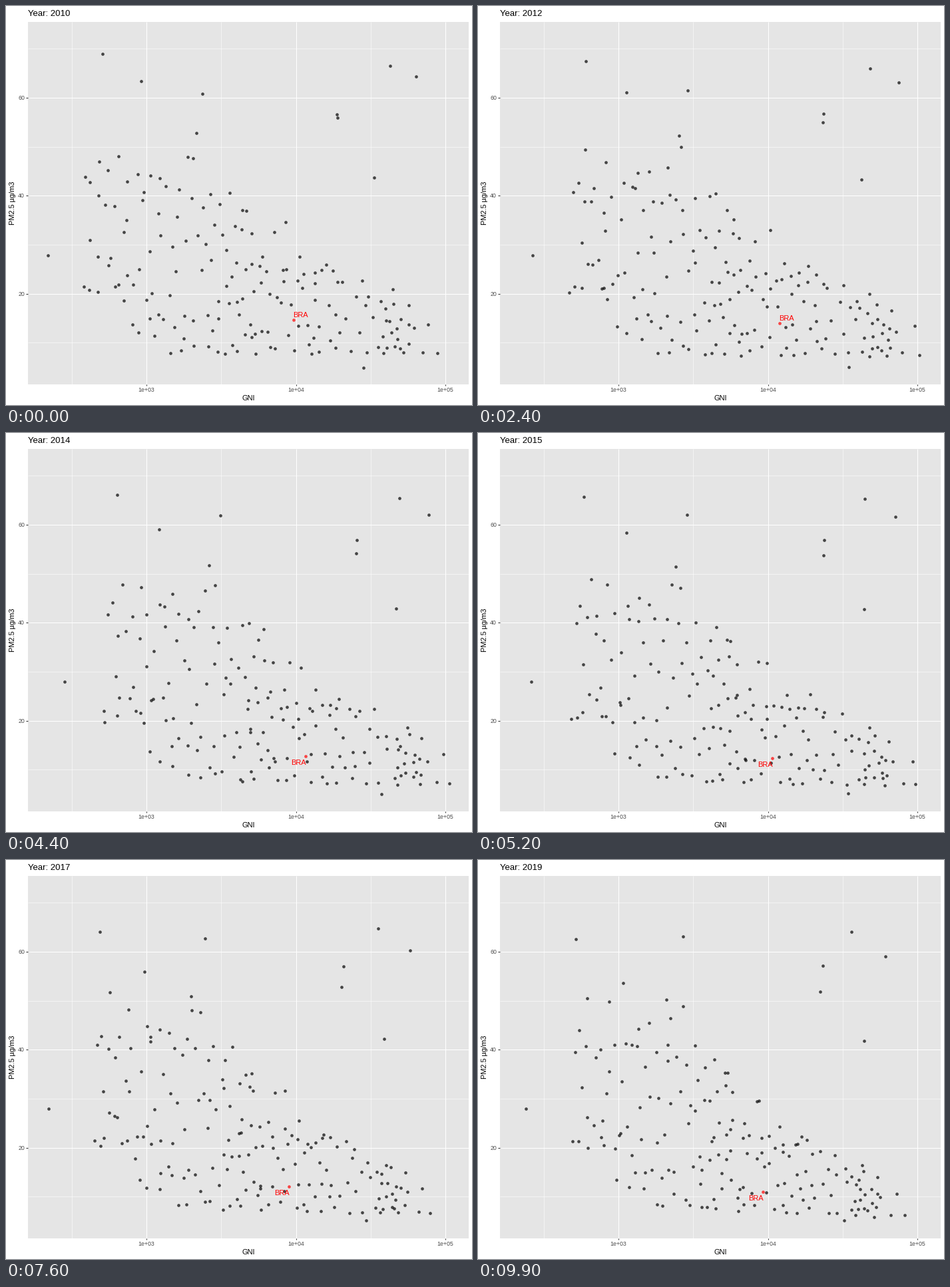
A matplotlib script for the animation above (10000 ms loop, 700 px wide and 600 px high).

```python
import numpy as np
import matplotlib.pyplot as plt
from matplotlib.animation import FuncAnimation
from matplotlib.patches import Rectangle

W, H, DPI = 700, 600, 100
FRAMES, STEPS, YEARS = 100, 11, 10      # 11 tween steps between yearly states
CLOUD = 172                             # dots in the random cloud
PX = 72 / DPI                           # points per pixel
LEFT, RIGHT, TOP, BOTTOM = 33, 694.5, 23.5, 568.5

plt.rcParams["font.family"] = "Liberation Sans"
rng = np.random.default_rng(5)
frames = np.arange(FRAMES)
years = frames / STEPS


def gni_x(log_gni):
    return 211 + 224.5 * (log_gni - 3)


def pm_y(pm):
    return 580 - 7.37 * pm


# Income swing shared by all dots: up until 2013, down until 2017, recovery.
swing = np.interp(years, [0, 3, 4, 6, 7, 9], [0, 23, 21, -2, -6, 0])

# Isolated dots: start x, y and end x, y.
OUTLIERS = np.array([
    [145, 71.5, 147, 119], [202.5, 112.5, 217.5, 184.5],
    [295, 131.5, 307.5, 114.5], [285.5, 190.5, 283, 210],
    [576.5, 90, 561, 107.5], [616, 106, 612, 145],
    [497, 163, 517.5, 158.5], [498, 168, 513.5, 198],
    [553, 258, 579.5, 272], [63, 375, 71.5, 373.5],
    [537, 543.5, 550, 541.5], [648, 522, 640.5, 533.5],
])


def drift(x0, y0, x1, y1):
    """Straight trend from start to end, plus the shared swing in x."""
    t = frames / (FRAMES - 1)
    return (x0[:, None] + np.outer(x1 - x0, t) + swing,
            y0[:, None] + np.outer(y1 - y0, t))


def wobble(size):
    """Independent yearly noise for the cloud, tweened linearly."""
    states = rng.normal(0, size, (CLOUD, YEARS))
    return np.array([np.interp(years, range(YEARS), s) for s in states])


def cloud():
    """Air gets cleaner, and its spread smaller, as income grows."""
    i = np.arange(CLOUD)
    u = (i + rng.random(CLOUD)) / CLOUD
    v = (i * 0.618034 + rng.normal(0, 0.06, CLOUD)) % 1
    x = np.interp(u, [0, 0.15, 0.4, 0.57, 0.8, 0.88, 0.98, 1],
                  [115, 200, 320, 380, 500, 565, 605, 640])
    floor = np.interp(x, [115, 250], [20, 7.3])
    span = np.interp(x, [115, 250, 350, 450, 600], [32, 44, 32, 24, 12])
    pm = floor + span * v ** 1.2
    x_end = x + np.interp(x, [170, 650], [27, -7])
    pm_end = pm * np.interp(x, [300, 600], [1, 0.78])
    xs, pms = drift(x, pm, x_end, pm_end)
    return xs + wobble(3), pm_y(pms * (1 + wobble(0.03)))


dots_x, dots_y = map(np.vstack, zip(drift(*OUTLIERS.T), cloud()))

# Highlighted country and its label side (1 = above right, -1 = below left).
bra_keys = [0, 14, 35, 52, 66, 85, 99]
bra_x = np.interp(frames, bra_keys, [432, 448, 458.5, 442, 424, 425.5, 427.5])
bra_y = np.interp(frames, bra_keys, [472, 472, 483, 489, 491.5, 490, 499])


def label_side(i):
    return 1 if i < 25 or 80 <= i < 93 else -1


fig = plt.figure(figsize=(W / DPI, H / DPI), dpi=DPI, facecolor="white")
ax = fig.add_axes([0, 0, 1, 1])
ax.set(xlim=(0, W), ylim=(H, 0))
ax.axis("off")


def line(xs, ys, color="white", width=1.07, z=2):
    ax.plot(xs, ys, color=color, lw=width * PX, solid_capstyle="butt", zorder=z)


def text(x, y, s, size, color="black", **kw):
    kw = {"ha": "center", "va": "baseline", "zorder": 5, **kw}
    return ax.text(x, y, s, fontsize=size * PX, color=color, **kw)


ax.add_patch(Rectangle((LEFT, TOP), RIGHT - LEFT, BOTTOM - TOP,
                       facecolor="#e5e5e5", lw=0, zorder=0))
for log_gni in (2.5, 3.5, 4.5):
    line([gni_x(log_gni)] * 2, [TOP, BOTTOM], width=0.55, z=1)
for pm in (10, 30, 50, 70):
    line([LEFT, RIGHT], [pm_y(pm)] * 2, width=0.55, z=1)
for power in (3, 4, 5):
    x = gni_x(power)
    line([x, x], [TOP, BOTTOM])
    line([x, x], [BOTTOM, BOTTOM + 2.8], "#333333")
    text(x, 580, f"1e+{power:02d}", 8.8, "#4d4d4d")
for pm in (20, 40, 60):
    y = pm_y(pm)
    line([LEFT, RIGHT], [y, y])
    line([LEFT - 2.8, LEFT], [y, y], "#333333")
    text(28, y + 3.2, str(pm), 8.8, "#4d4d4d", ha="right")

text(364, 593, "GNI", 11)
text(10, 296, "PM2.5 µg/m3", 11, rotation=90, va="center")
title = text(33, 15, "", 13.2, ha="left")

dot = dict(s=(4.7 * PX) ** 2, alpha=0.7, linewidths=0)
dots = ax.scatter(dots_x[:, 0], dots_y[:, 0], color="black", zorder=3, **dot)
bra = ax.scatter(bra_x[:1], bra_y[:1], color="red", zorder=4, **dot)
label = text(0, 0, "BRA", 11.04, "red")


def update(i):
    dots.set_offsets(np.column_stack([dots_x[:, i], dots_y[:, i]]))
    bra.set_offsets([[bra_x[i], bra_y[i]]])
    side = label_side(i)
    label.set_position((bra_x[i] + 10.5 * side, bra_y[i] + 4.5 - 8.5 * side))
    title.set_text(f"Year: {2010 + round(i / STEPS)}")
    return dots, bra, label, title


anim = FuncAnimation(fig, update, frames=FRAMES, interval=100,
                     repeat=True, repeat_delay=0)
plt.show()
```
